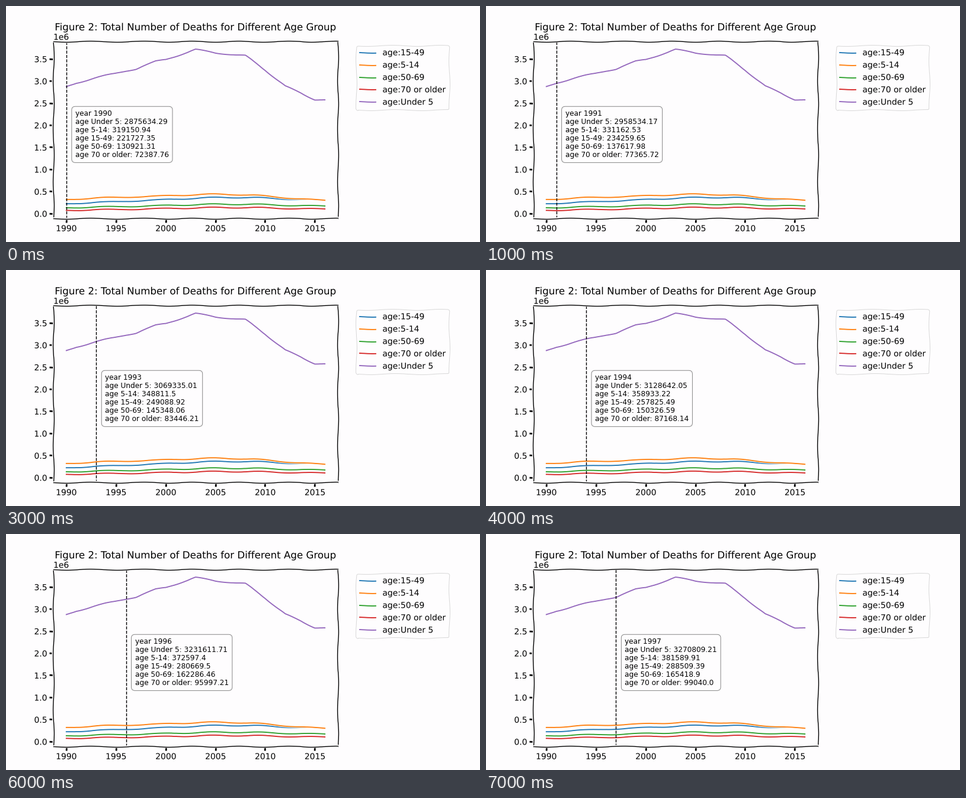
Write a matplotlib script that moves like this. It is 800 px wide and 400 px high and loops after 8 s.

```python
import matplotlib.pyplot as plt
import numpy as np
from matplotlib import patheffects
from matplotlib.animation import FuncAnimation

PAPER = "#fefdfe"
DPI = 200 / 3
START, SPLIT, END = 1990, 1997, 2016
YEARS = np.arange(START, END + 1)

plt.rcParams.update({
    "font.family": "DejaVu Sans",
    "font.size": 15,
    "path.sketch": (0.926, 92.6, 2),
    "path.effects": [patheffects.withStroke(linewidth=4, foreground=PAPER)],
    "figure.facecolor": PAPER,
    "axes.facecolor": PAPER,
    "axes.linewidth": 1.5,
    "lines.linewidth": 2,
})
for axis in ("xtick", "ytick"):
    plt.rcParams.update({f"{axis}.major.size": 8, f"{axis}.major.width": 3})

# Key readings; the years between are interpolated
KEY_YEARS = [1990, 1991, 1992, 1994, 1996, SPLIT]
readings = {
    "Under 5": [2875634.29, 2958534.17, 3010027.97,
                3128642.05, 3231611.71, 3270809.21],
    "5-14": [319150.94, 331162.53, 338689.78, 358933.22, 372597.4, 381589.91],
    "15-49": [221727.35, 234259.65, 240352.35, 257825.49, 280669.5, 288509.39],
    "50-69": [130921.31, 137617.98, 140369.53, 150326.59, 162286.46, 165418.9],
    "70 or older": [72387.76, 77365.72, 79724.27, 87168.14, 95997.21, 99040.0],
}

# After the split: height of the hump and overall drift
trends = {
    "5-14": (95e3, -85e3),
    "15-49": (72e3, 10e3),
    "50-69": (46e3, 2e3),
    "70 or older": (37e3, 1e3),
}
# Corners of the top curve after the split, in millions
corners = {1999: 3.445, 2000: 3.485, 2003: 3.715, 2005: 3.635, 2008: 3.575,
           2010: 3.25, 2012: 2.885, 2015: 2.58, 2016: 2.573}


def series(group):
    early = np.interp(YEARS, KEY_YEARS, readings[group])
    if group in trends:
        hump, drift = trends[group]
        t = np.clip((YEARS - SPLIT) / (END - SPLIT), 0, 1)
        return early + hump * np.abs(np.sin(np.pi * t)) ** 1.5 + drift * t
    millions = [early[-1] / 1e6, *corners.values()]
    late = 1e6 * np.interp(YEARS, [SPLIT, *corners], millions)
    return np.where(YEARS < SPLIT, early, late)


def plain(artist):
    """Turn off the hand-drawn look for one artist."""
    artist.set_sketch_params(None)
    artist.set_path_effects([])


curves = {group: series(group) for group in readings}

fig = plt.figure(figsize=(12, 6), dpi=DPI)
ax = fig.add_axes([0.1, 0.1, 0.6, 0.75])
for group in sorted(curves):
    ax.plot(YEARS, curves[group], label=f"age:{group}")
ax.set_title("Figure 2: Total Number of Deaths for Different Age Group",
             x=0.498, pad=5.3)
ax.legend(bbox_to_anchor=(1.05, 1), loc="upper left")

cursor = ax.axvline(START, color="black", linestyle="--", linewidth=1.5)
note = ax.text(
    START + 0.9, 0.474, "", fontsize=13.1, linespacing=1.1, va="center",
    transform=ax.get_xaxis_transform(),
    bbox=dict(boxstyle="round,pad=0.5", facecolor=PAPER, edgecolor="black",
              linewidth=1, alpha=0.5),
)
for artist in (cursor, note, note.get_bbox_patch()):
    plain(artist)


def update(step):
    year = START + step
    cursor.set_xdata([year, year])
    rows = [f"age {group}: {round(float(curve[step]), 2)}"
            for group, curve in curves.items()]
    note.set_text("\n".join([f"year {year}", *rows]))
    note.set_x(year + 0.9)
    return cursor, note


anim = FuncAnimation(fig, update, frames=SPLIT - START + 1, interval=1000,
                     repeat=True)
plt.show()
```
